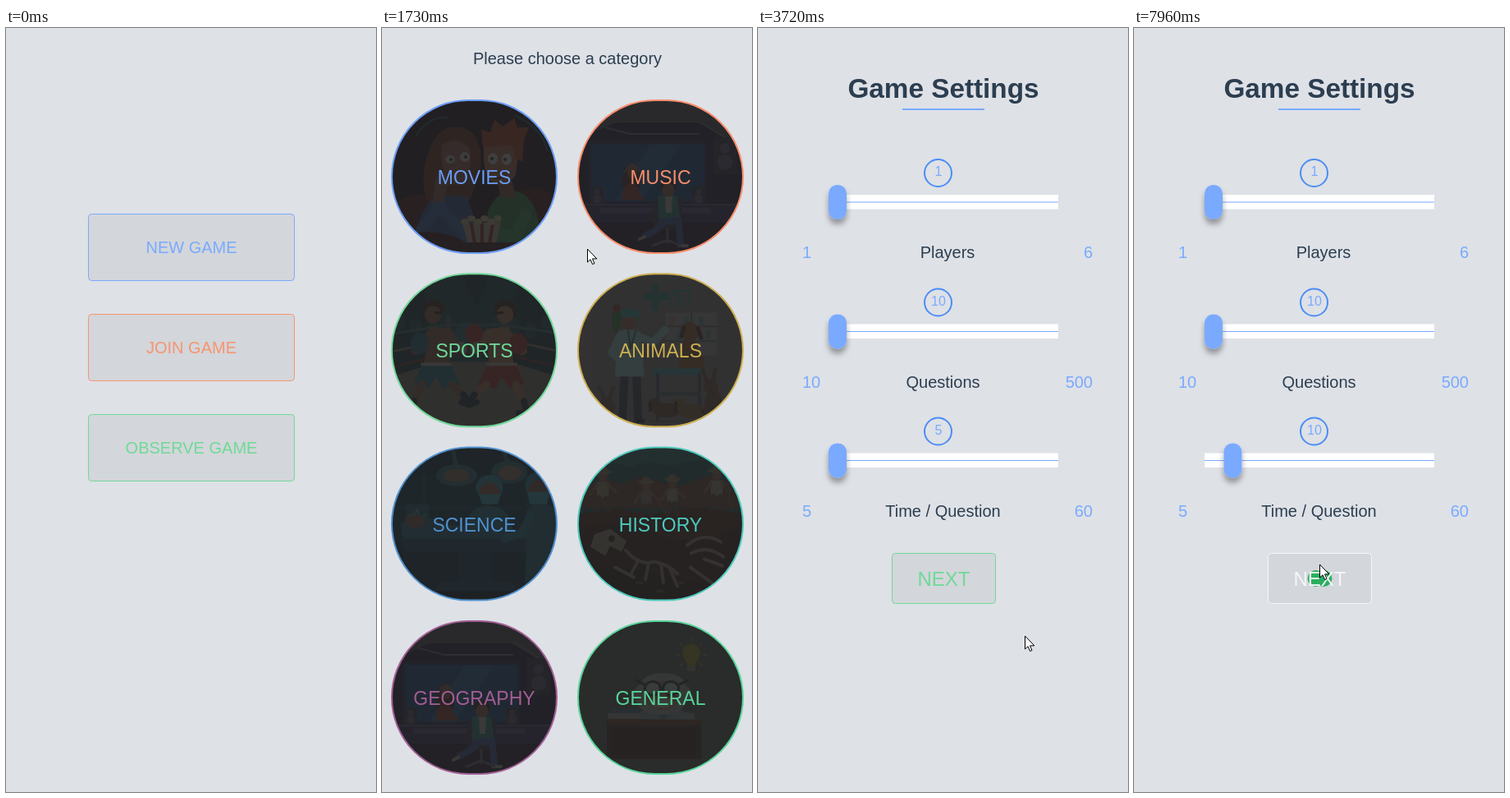
Write an HTML page that moves like this. It is 451 px wide and 930 px high and loops after 8000 ms.

```html
<!DOCTYPE html>
<html lang="en">
<head>
<meta charset="utf-8">
<title>Quiz game</title>
<style>
html, body { margin: 0; width: 100%; height: 100%; overflow: hidden; background: #dee1e6; }
svg { display: block; width: 100%; height: 100%; }
text { font-family: "Liberation Sans", Arial, sans-serif; font-size: 20px; fill: #2c3e50; }
</style>
</head>
<body>
<svg id="stage" viewBox="0 0 451 930"></svg>
<script>
const LOOP = 8000, BLUE = '#7aaaff';

// Drawing helpers
const path = (d, fill, stroke = 'none', w = 1) =>
  `<path d="${d}" fill="${fill}" stroke="${stroke}" stroke-width="${w}" stroke-linecap="round" stroke-linejoin="round"/>`;
const line = (d, stroke, w) => path(d, 'none', stroke, w);
const oval = (x, y, rx, ry, fill) => `<ellipse cx="${x}" cy="${y}" rx="${rx}" ry="${ry}" fill="${fill}"/>`;
const box = (x, y, w, h, fill, r = 0, more = '') =>
  `<rect x="${x}" y="${y}" width="${w}" height="${h}" fill="${fill}" rx="${r}" ${more}/>`;
const label = (x, y, str, fill = '#2c3e50', size = 20, anchor = 'middle', more = '') =>
  `<text x="${x}" y="${y}" text-anchor="${anchor}" style="font-size:${size}px;fill:${fill}" ${more}>${str}</text>`;

// Tile pictures, each on a 203 by 188 field
const face = (x, y, r, skin, hair) =>
  oval(x, y - r * .35, r * 1.1, r, hair) + oval(x, y + r * .15, r * .85, r * .9, skin);

const movies = () => box(0, 0, 203, 188, '#0c0307') +
  path('M0 130Q30 105 60 125L60 188H0ZM140 118Q185 95 203 125V188H140Z', '#250509') +
  line('M30 45Q45 20 70 22M152 20Q185 35 190 62', '#0c2630', 2) +
  path('M48 128C30 110 42 40 72 34C104 28 114 60 108 90L96 122Z', '#35150b') +
  path('M30 188Q28 130 62 116L92 118Q108 150 98 188Z', '#152647') +
  path('M62 56Q80 42 96 60Q102 92 80 104Q58 96 62 56Z', '#4c2a22') +
  oval(72, 73, 6, 5, '#67605d') + oval(90, 70, 6, 6, '#67605d') + oval(73, 73, 2, 2, '#101010') + oval(91, 70, 2, 2, '#101010') +
  path('M54 96L70 84L80 98L68 106L62 140L50 134Z', '#48281f') + line('M36 160L58 130L94 168', '#1a2f56', 13) +
  path('M118 188L118 136Q130 108 154 112Q186 122 180 188Z', '#123c1d') +
  path('M128 92L148 100L152 120L134 120Z', '#44251a') +
  path('M114 50Q136 38 156 58L152 92Q138 112 120 98Q110 82 114 50Z', '#56301f') +
  path('M112 58L110 36L121 40L126 25L136 33L150 23L154 34L168 34L162 50L160 76L152 72L148 56Z', '#571907') +
  oval(124, 72, 6, 7, '#6b6662') + oval(141, 73, 6, 7, '#6b6662') + oval(123, 72, 2, 2, '#101010') + oval(139, 73, 2, 2, '#101010') +
  line('M124 94Q132 98 140 92', '#250c08', 2) + line('M164 140L152 166L124 164', '#184a25', 15) +
  path('M87 151L134 149L128 176H94Z', '#5b5144') + line('M98 152L102 175M111 152V175M124 151L120 175', '#4b0d10', 4) +
  [0, 1, 2, 3, 4, 5].map(i => oval(90 + i * 8, 149 - i % 2 * 4, 5, 4, '#64593d')).join('') +
  path('M0 168Q60 152 90 174H203V188H0Z', '#1d0408');

const speaker = (x, y, w, h) => box(x, y, w, h, '#18161f', 2) + oval(x + w / 2, y + h * .3, w * .22, w * .22, '#292735') + oval(x + w / 2, y + h * .68, w * .33, w * .33, '#292735');

const music = () => box(0, 0, 203, 188, '#0c0917') + path('M0 0H203V62L150 28H48L0 48Z', '#252428') +
  line('M34 34L64 42H148M150 28L203 60', '#343239', 2) +
  box(16, 53, 140, 72, '#082441', 3) + path('M90 53H128L76 125H46Z', '#0b2c4d') +
  line('M16 53H156V125H16Z', '#111028', 3) +
  path('M56 108Q52 80 66 76Q80 80 76 108Z', '#25100d') + oval(67, 88, 6, 8, '#4a2a22') + path('M54 122Q55 100 70 102L82 122Z', '#471912') +
  line('M58 88Q66 70 76 87', '#3b3336', 2) +
  speaker(166, 46, 28, 45) + speaker(16, 106, 16, 22) + speaker(140, 106, 16, 22) +
  path('M2 128H196L203 150H0Z', '#17132a') + line('M2 128H196', '#272240', 2) +
  box(28, 132, 135, 6, '#28223b') + path('M0 152H203V188H0Z', '#110911') +
  path('M95 120L89 148L99 160L126 156L128 120Z', '#181421') +
  path('M98 118Q110 112 122 119L126 146H99Z', '#123c3b') + path('M107 118H116L115 138H108Z', '#5b5a55') +
  face(111, 109, 9, '#4b2d20', '#1d0d09') +
  line('M102 149L123 147L126 174M106 150L94 160L84 165', '#18274a', 8) + line('M124 178H134M82 167L76 170', '#55504c', 4) +
  line('M110 158V174M92 178L110 171L126 178', '#302d38', 3);

const boxer = (skin, glove, shorts, flip) => `<g transform="${flip ? 'translate(190)scale(-1 1)' : ''}">` +
  path('M46 65L74 68L70 116L40 116Z', skin) + line('M50 74L30 94L40 82M70 74L88 90', skin, 12) +
  oval(35, 86, 11, 13, glove) + oval(89, 74, 11, 12, glove) + line('M86 88L88 94', '#55514b', 9) +
  face(51, 49, 12, skin, '#1c0d09') + line('M54 48L60 49', '#120907', 3) +
  path('M38 110L72 110L84 136L62 140L55 126L46 140L28 134Z', shorts) + line('M38 111H72', '#59544b', 4) +
  line('M38 135L28 158M74 136L88 150', skin, 9) + line('M28 156L24 171L34 171M88 148L96 160L104 157', '#0d1217', 8) + '</g>';

const sports = () => box(0, 0, 203, 188, '#071418') + path('M35 0L85 0L140 116H62ZM120 0H160L122 116H80Z', '#0b2021') +
  [0, 1, 2, 3, 4, 5, 6, 7, 8, 9].map(i => oval(10 + i * 20, 60 + i % 3 * 5, 8, 10, '#0f2125')).join('') +
  path('M0 126L60 108H145L203 126V188H0Z', '#3b352b') +
  line('M0 74L70 63H136L203 73', '#183334', 3) + line('M0 96L70 80H136L203 95', '#403733', 3) + line('M0 115L70 98H136L203 114', '#35130e', 3) +
  line('M70 54V110M136 54V110', '#202b2c', 5) +
  boxer('#44291a', '#0c3038', '#0b3540', false) + boxer('#563723', '#501510', '#52140e', true);

const dog = (x, y, fill) => oval(x, y, 17, 9, fill) + oval(x - 15, y - 7, 8, 8, fill) + line(`M${x - 20} ${y - 10}V${y}M${x + 13} ${y}L${x + 22} ${y + 6}`, '#24150d', 4);

const animals = () => box(0, 0, 203, 188, '#423e3e') +
  line('M95 17V42M83 29H108', '#16433e', 9) +
  label(125, 34, 'VET', '#174640', 18, 'middle', 'font-weight="bold"') + label(125, 41, 'HOSPITAL', '#174640', 7, 'middle', 'font-weight="bold"') +
  box(108, 48, 62, 52, '#514d4c') + line('M108 65H170M108 83H170M139 48V100', '#343231', 2) +
  [0, 1, 2, 3, 4, 5].map(i => box(112 + i * 9, 53 + i % 2 * 17, 6, 11, i % 3 ? '#32454a' : '#554030')).join('') +
  line('M58 118L55 177M72 118L74 177', '#171b24', 10) + line('M52 180H58M74 180H80', '#101218', 5) +
  path('M49 72Q61 65 77 72L82 126H46Z', '#4b6669') + line('M76 77L92 85L107 69M51 78L42 97L53 107', '#4b6669', 9) +
  line('M62 71L65 92L71 71', '#163435', 2) + face(63, 58, 11, '#503025', '#1a4748') + oval(63, 49, 14, 5, '#1c5050') +
  path('M43 66Q39 46 49 39Q56 46 52 67L47 75Z', '#1c3d1b') + oval(48, 43, 5, 5, '#4d1b12') +
  path('M125 106Q124 80 138 75L154 104V117H123Z', '#4a2b13') + oval(137, 72, 11, 12, '#4a2b13') + line('M130 66L127 77M147 67L151 79', '#28140b', 5) +
  box(91, 116, 64, 8, '#1b4a4c', 2) + line('M98 123V178M149 123V178', '#242a2b', 4) + box(96, 145, 55, 4, '#292f30') +
  dog(109, 167, '#3a2112') + dog(140, 168, '#482f17') +
  path('M154 176Q154 144 166 139Q180 148 177 177Z', '#39251a') + oval(163, 138, 9, 9, '#39251a') + line('M158 132L153 118M166 132L168 117', '#39251a', 5) +
  oval(36, 164, 10, 13, '#352a24') + line('M33 152L27 140M39 152L44 140', '#352a24', 5) + line('M30 181H70M94 181H183', '#343030', 2);

const science = () => box(0, 0, 203, 188, '#031119') + path('M0 35H203V115H0Z', '#041a24') +
  line('M40 8V100M165 8V102M5 75H199', '#06222d', 2) +
  line('M75 0L80 28M135 0L145 26', '#123039', 5) + oval(80, 35, 25, 13, '#12323b') + oval(80, 35, 16, 8, '#403429') +
  oval(144, 31, 22, 14, '#12323b') + oval(145, 32, 14, 9, '#433529') +
  box(18, 70, 28, 24, '#0c2835', 2) + line('M21 84L28 82L32 76L36 89L42 82', '#175044', 2) +
  path('M97 122L99 79Q116 65 139 79L143 123Z', '#0e3b45') + face(120, 55, 15, '#44291f', '#104650') + path('M107 58H134L130 70H111Z', '#17515a') +
  line('M101 85L90 106L110 111M137 85L145 107L124 113', '#0d3640', 11) +
  path('M12 93Q37 78 67 95L166 103L173 124H16Z', '#0b303e') + oval(29, 91, 12, 8, '#3e281f') +
  path('M10 112H180L172 129H18Z', '#071f31') + box(82, 128, 42, 37, '#061928') + path('M62 164H146L157 176H52Z', '#071d2b') +
  path('M163 178L166 77Q181 60 203 78V188Z', '#0a2f39') + face(181, 52, 16, '#3b241d', '#0b3d48') + path('M166 55L193 55L190 70H169Z', '#145057') +
  line('M170 85L159 105L139 112', '#0c3944', 10) + path('M0 176H203V188H0Z', '#02090f');

const digger = (x, y, s, shirt) => `<g transform="translate(${x} ${y})scale(${s})">` + path('M-8 12H8L7 31H-7Z', shirt) +
  line('M-4 31L-6 47M4 31L7 47', '#2e2018', 5) + line('M-7 15L-15 27M7 15L16 24', '#472b1d', 4) +
  oval(0, 5, 6, 7, '#4b2d20') + oval(0, 0, 11, 3, '#4b3b25') + oval(0, -2, 6, 5, '#4b3b25') + '</g>';

const history = () => box(0, 0, 203, 188, '#0c2829') + path('M0 28Q40 14 65 26Q85 13 115 24Q150 9 203 26V0H0Z', '#133632') +
  path('M0 55L30 38L52 45L80 37L123 49L160 35L203 48V75H0Z', '#321c11') + path('M0 82L48 75L87 83L143 74L203 81V188H0Z', '#251009') +
  path('M0 100Q45 87 95 106T203 94V188H0Z', '#1b0b07') + path('M0 157Q50 140 105 157T203 153V188H0Z', '#150705') +
  digger(31, 31, 1, '#4d4330') + digger(84, 43, .9, '#433b30') + digger(116, 40, .9, '#514838') + digger(170, 29, 1, '#504737') +
  line('M18 55L35 70M182 46L188 76M97 65L107 80', '#3a2515', 3) +
  path('M21 107L40 100L60 115L54 128L40 121L34 133L16 122Z', '#4b4336') + oval(42, 112, 4, 4, '#1a0b08') +
  line('M59 126Q76 146 94 140Q111 143 122 155M74 139L65 156M87 142L83 162M102 143L105 166M113 149L122 170', '#443c31', 4) +
  line('M134 120Q154 103 175 116M139 130Q158 119 178 134M138 147L167 168M46 147L69 159M155 137L177 145', '#4a4135', 4) +
  [0, 1, 2, 3, 4, 5, 6].map(i => oval(26 + i * 25, 166 + i % 2 * 10, 5, 2, '#302018')).join('');

const general = () => box(0, 0, 203, 188, '#272d23') +
  path('M130 46A11 11 0 1 1 148 46Q144 51 144 56H134Q134 50 130 46Z', '#51480c') + box(134, 56, 10, 6, '#444334', 2) +
  line('M121 42H124M154 42H157M139 22V25M126 29L128 31M152 29L150 31M126 55L128 53M152 55L150 53', '#51480c', 2) +
  path('M70 120Q77 105 101 106Q139 108 144 122Z', '#40464a') + path('M91 108L105 122L117 108Z', '#243844') +
  path('M72 99Q61 88 77 78Q81 65 104 64Q130 65 132 79Q147 90 132 101Q126 116 103 115Q78 115 72 99Z', '#4d504d') +
  path('M82 80Q101 67 124 80L121 103Q103 116 85 102Z', '#533c2d') +
  oval(92, 83, 11, 10, '#11140f') + oval(114, 83, 11, 10, '#11140f') + oval(92, 83, 8, 7, '#58605a') + oval(114, 83, 8, 7, '#58605a') +
  line('M81 78L72 73M125 78L135 73M101 82H105', '#11140f', 3) + oval(103, 93, 6, 7, '#593e2c') + path('M87 99Q104 92 119 100L111 106H94Z', '#5b5d58') +
  box(37, 113, 40, 7, '#4b4b43') + box(42, 107, 34, 6, '#24323b') + box(118, 113, 25, 7, '#444a45') +
  box(36, 121, 115, 48, '#24110b') + box(36, 121, 115, 6, '#32170c') + box(42, 132, 103, 32, '#1f0d08');

const TILES = [
  ['MOVIES', '#6b9df5', movies], ['MUSIC', '#f88e6c', music],
  ['SPORTS', '#70d798', sports], ['ANIMALS', '#cdb052', animals],
  ['SCIENCE', '#4f91cf', science], ['HISTORY', '#4dcabc', history],
  ['GEOGRAPHY', '#a25d94', music], ['GENERAL', '#58d59a', general]
];

const tile = ([name, color, draw], i) => {
  const cx = i % 2 ? 339.5 : 112.5, cy = 181 + (i >> 1) * 211.3;
  return `<g class="tile" data-at="${cx} ${cy}"><g transform="translate(${cx - 101.5} ${cy - 94})">
    ${box(1, 1, 201, 186, '#2c2d2e', 93)}<g class="pic" clip-path="url(#round)">${draw()}</g>
    ${box(1, 1, 201, 186, 'none', 93, `stroke="${color}" stroke-width="2"`)}
    ${label(101.5, 103, name, color, 23)}</g></g>`;
};

const button = (id, x, y, w, h, name, color, fill, size) =>
  `<g id="${id}"><clipPath id="${id}Clip">${box(x, y, w, h, '#000', 4)}</clipPath>
  ${box(x, y, w, h, '#d3d6da', 4)}<g clip-path="url(#${id}Clip)">${oval(0, 0, 0, 0, fill).repeat(2)}</g>
  ${box(x, y, w, h, 'none', 4, `class="edge" stroke="${color}"`)}
  ${label(x + w / 2, y + h / 2 + size * .36, name, color, size)}</g>`;

const slider = (y, id, value, min, name, nameX, max) =>
  `<circle cx="219.5" cy="${y - 35.5}" r="16.5" fill="none" stroke="#4b8df5" stroke-width="2"/>` +
  label(220, y - 32, value, BLUE, 16, 'middle', `id="${id}Value"`) +
  box(86, y - 9, 280, 17.5, '#fff') + box(86, y - .5, 280, 1, BLUE) +
  box(86, y - 21, 22, 42, BLUE, 10.5, `id="${id}" filter="url(#shadow)"`) +
  label(54, y + 68, min, BLUE, 20, 'start') + label(nameX, y + 68, name) + label(408, y + 68, max, BLUE, 20, 'end');

const $ = id => document.getElementById(id);
$('stage').innerHTML = `<defs>
  <clipPath id="round">${box(1, 1, 201, 186, '#000', 93)}</clipPath>
  <filter id="shadow" x="-100%" y="-50%" width="300%" height="220%"><feDropShadow dx="0" dy="6" stdDeviation="3.5" flood-color="#000" flood-opacity=".35"/></filter></defs>
  ${box(0, 0, 451, 930, '#dee1e6')}
  <g id="menu">${button('newGame', 100.5, 226.5, 251, 81, 'NEW GAME', BLUE, '#4a89f3', 20)}
    ${button('joinGame', 100.5, 348.5, 251, 81, 'JOIN GAME', '#f79471', 'none', 20)}
    ${button('observe', 100.5, 470.5, 251, 81, 'OBSERVE GAME', '#70d998', 'none', 20)}</g>
  <g id="categories">${label(226, 44, 'Please choose a category')}${TILES.map(tile).join('')}</g>
  <g id="settings">${label(226, 85, 'Game Settings', '#2c3e50', 33.3, 'middle', 'font-weight="bold"')}
    ${box(176, 98, 100, 2, BLUE)}
    ${slider(212, 'players', 1, 1, 'Players', 231, 6)}
    ${slider(369.5, 'questions', 10, 10, 'Questions', 225.5, 500)}
    ${slider(526.5, 'time', 5, 5, 'Time / Question', 225.5, 60)}
    ${button('next', 163.5, 639.5, 126, 61, 'NEXT', '#70d998', '#2bae5f', 24)}</g>
  <g id="cursor">
    <g id="arrow">${path('M.5 .5V16L4 12.8L6.6 18.6L9 17.5L6.5 11.9H11.5Z', '#fff', '#000')}</g>
    <g id="hand">${path('M-2 14V2Q-1.800 .3 0 .3Q1.800 .3 2 2V8Q4.500 6.500 5.500 8.800Q8 7.500 8.800 10Q11.500 9.300 11.800 12V16Q11.500 19 9.500 22H0L-5.500 14Q-6.500 11.500-4.500 11.500Q-3 11.500-2 14Z', '#fff', '#000')}${line('M2 8V12M5.500 9V12.500M8.800 10V13', '#000', 1)}</g>
    <g id="ibeam">${line('M-3-7H-1L0-6L1-7H3M0-6V7M-3 8H-1L0 7L1 8H3', '#b0761a', 1.2)}</g></g>`;

// Cursor track: time, x, y and, where it changes, the shape
const TRACK = [
  [300, 412, 875, 'arrow'], [452, 390, 760], [604, 340, 560], [756, 290, 370], [832, 268, 302], [908, 257, 285],
  [1060, 251, 269, 'ibeam'], [1660, 250, 269, 'arrow'], [2429, 250, 269], [2430, 260, 292],
  [2506, 275, 335, 'hand'], [2582, 290, 420], [2658, 303, 515], [2734, 315, 600], [2810, 323, 680],
  [2886, 330, 740], [2962, 335, 775], [3180, 338, 792], [3400, 338, 791, 'arrow'], [3719, 338, 791],
  [3720, 325, 740], [3796, 285, 560], [3872, 245, 400], [3948, 229, 332], [4439, 229, 332],
  [4440, 229, 360], [4592, 223, 550], [4668, 221, 640], [4744, 220, 680], [4820, 219, 692],
  [4896, 195, 670], [4972, 160, 620], [5048, 125, 570], [5190, 101, 535, 'hand'], [5310, 100, 533],
  [5759, 100, 533], [5760, 102, 533], [6444, 126, 535], [6939, 126, 535], [6940, 123, 536], [7000, 121.500, 536],
  [7569, 121.500, 536], [7570, 133, 560, 'arrow'], [7646, 172, 625], [7722, 200, 645], [7950, 226, 653]
];
// Each burst of movement advances in short even steps
const BURSTS = [0, 300, 1180, 1660, 2430, 3240, 3400, 3720, 4440, 5310, 5460, 5760, 6940, 7570];
const STEP = 76;
const TILE_HOVERS = { 3: [2475, 2640], 5: [2660, 2850], 7: [2870, 9000] };

const clamp = v => Math.max(0, Math.min(1, v));
const ease = x => {
  if (x <= 0 || x >= 1) return clamp(x);
  let lo = 0, hi = 1, u;
  for (let i = 0; i < 18; i++) {
    u = (lo + hi) / 2;
    if (.75 * u * (1 - u) + u ** 3 < x) lo = u; else hi = u;
  }
  return .3 * u * (1 - u) ** 2 + 3 * u * u * (1 - u) + u ** 3;
};
const show = (id, on) => $(id).style.display = on ? '' : 'none';

function cursorAt(t) {
  let i = TRACK.findLastIndex(k => k[0] <= t);
  if (i < 0) return null;
  const a = TRACK[i], b = TRACK[i + 1] || a;
  const f = a === b ? 0 : (t - a[0]) / (b[0] - a[0]);
  const shape = TRACK.slice(0, i + 1).findLast(k => k[3])[3];
  return { x: a[1] + (b[1] - a[1]) * f, y: a[2] + (b[2] - a[2]) * f, shape };
}

// Two dots run in from the sides, meet, then grow over the button
function hover(id, since, color) {
  const g = $(id), edge = g.querySelector('.edge'), on = since >= 0;
  const [x, y, w, h] = ['x', 'y', 'width', 'height'].map(n => +edge.getAttribute(n));
  const pos = -20 + (w / 2 + 20) * ease(since / 400);
  const r = on ? 10 + 177.5 * ease((since - 400) / 400) : 0;
  g.querySelectorAll('ellipse').forEach((dot, i) => {
    const at = { cx: i ? x + w - pos : x + pos, cy: y + h / 2, rx: r, ry: r };
    for (const n in at) dot.setAttribute(n, at[n]);
  });
  edge.setAttribute('stroke', on ? '#f6f7f9' : color);
  g.querySelector('text').style.fill = on ? '#f4f6f8' : color;
}

function draw(time) {
  const start = BURSTS.findLast(b => b <= time);
  const t = start + Math.floor((time - start) / STEP) * STEP;
  show('menu', t < 1660);
  show('categories', t >= 1660 && t < 3400);
  show('settings', t >= 3400);

  hover('newGame', t - 820, BLUE);
  hover('next', t >= 7670 ? t - 7670 : t < 4960 ? t - 4670 : -1, '#70d998');

  document.querySelectorAll('.tile').forEach((el, i) => {
    const [enter, leave] = TILE_HOVERS[i] || [9000, 9000];
    const s = 1 + .1 * (ease((t - enter) / 300) - ease((t - leave) / 300));
    const at = el.dataset.at.split(' ');
    el.setAttribute('transform', `translate(${at[0]} ${at[1]})scale(${s})translate(${-at[0]} ${-at[1]})`);
    el.querySelector('.pic').style.opacity = clamp((t - 1600) / 200);
  });

  const c = cursorAt(t);
  show('cursor', c);
  if (c) {
    $('cursor').setAttribute('transform', `translate(${c.x} ${c.y})`);
    ['arrow', 'hand', 'ibeam'].forEach(id => show(id, id === c.shape));
  }
  const grip = t < 5460 ? 97 : cursorAt(Math.min(t, 7016)).x;
  const value = Math.round(5 + (grip - 97) / 258 * 55);
  $('time').setAttribute('x', 86 + (value - 5) / 55 * 258);
  $('timeValue').textContent = value;
}

function frame() {
  draw(performance.now() % LOOP);
  requestAnimationFrame(frame);
}
frame();
</script>
</body>
</html>
```
